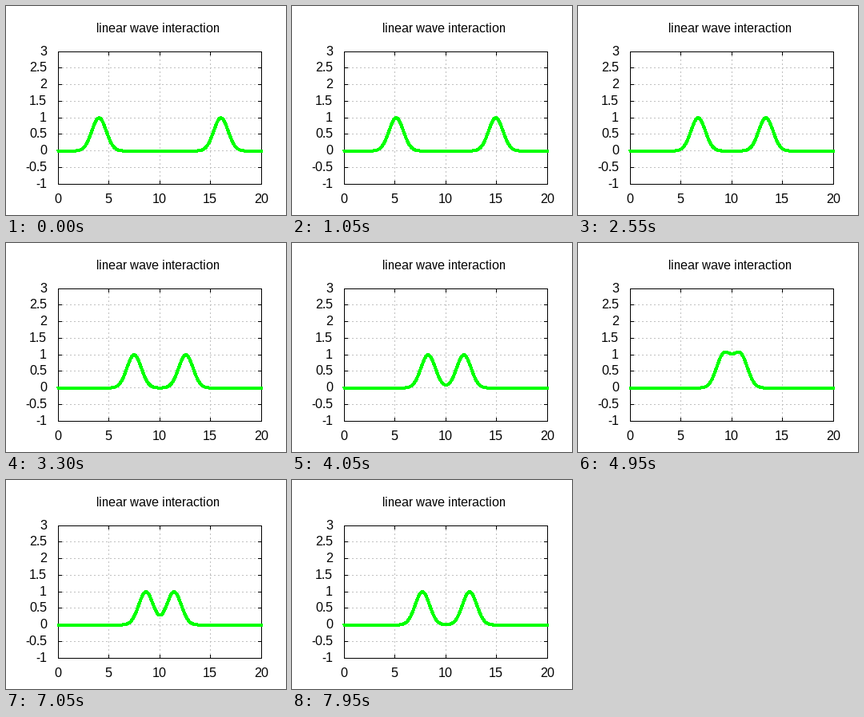
Recreate the animation shown at these times as a matplotlib script. Size 350x262 px, loop 8000 ms.

```python
import numpy as np
import matplotlib.pyplot as plt
from matplotlib.animation import FuncAnimation

WIDTH, HEIGHT, DPI = 350, 262, 100
LEFT, RIGHT, TOP, BOTTOM = 65, 319, 57, 223
PX = 72 / DPI  # points per pixel
TICK = 4
INTERVAL, FRAMES, HOLD = 50, 160, 3
SPEED = np.pi / 20

plt.rcParams.update({
    "font.family": "Liberation Sans",
    "font.size": 16 * PX,
    "text.hinting": "native",
    "text.hinting_factor": 1,
})


def to_px(x):
    return LEFT + np.asarray(x) * (RIGHT - LEFT) / 20


def to_py(y):
    return BOTTOM - (np.asarray(y) + 1) * (BOTTOM - TOP) / 4


fig = plt.figure(figsize=(WIDTH / DPI, HEIGHT / DPI), dpi=DPI, facecolor="white")
ax = fig.add_axes([0, 0, 1, 1])
ax.set_xlim(0, WIDTH)
ax.set_ylim(HEIGHT, 0)
ax.axis("off")


def stroke(xs, ys, color="black", width=1, **style):
    return ax.plot(xs, ys, color=color, lw=width * PX, antialiased=False,
                   **style)[0]


def grid_line(xs, ys):
    stroke(xs, ys, "#c0c0c0", dashes=(2, 3), dash_capstyle="butt", zorder=1)


def label(x, y, text, align="center"):
    ax.text(x, y, text, ha=align, va="baseline", color="black")


for value in range(0, 21, 5):
    x = int(to_px(value))
    if 0 < value < 20:
        grid_line([x, x], [BOTTOM, TOP])
    stroke([x, x], [BOTTOM, BOTTOM - TICK])
    stroke([x, x], [TOP, TOP + TICK])
    label(x, 247, str(value))

for value in np.arange(-1, 3.5, 0.5):
    y = int(to_py(value))
    if -1 < value < 3:
        grid_line([LEFT, RIGHT], [y, y])
    stroke([LEFT, LEFT + TICK], [y, y])
    stroke([RIGHT, RIGHT - TICK], [y, y])
    label(51, y + 5, f"{value:g}", "right")

stroke([LEFT, RIGHT, RIGHT, LEFT, LEFT], [BOTTOM, BOTTOM, TOP, TOP, BOTTOM])
label(190, 33, "linear wave interaction")

grid = np.linspace(0, 20, 401)
wave = stroke([], [], "#00ff00", 3, zorder=5, snap=False,
              solid_capstyle="projecting", solid_joinstyle="round")


def update(frame):
    shift = SPEED * (frame // HOLD)
    height = np.exp(-(grid - 4 - shift) ** 2) + np.exp(-(grid - 16 + shift) ** 2)
    wave.set_data(to_px(grid) + 0.5, to_py(height) + 0.25)
    return (wave,)


anim = FuncAnimation(fig, update, frames=FRAMES, interval=INTERVAL,
                     repeat=True, repeat_delay=0, blit=False)
plt.show()
```
